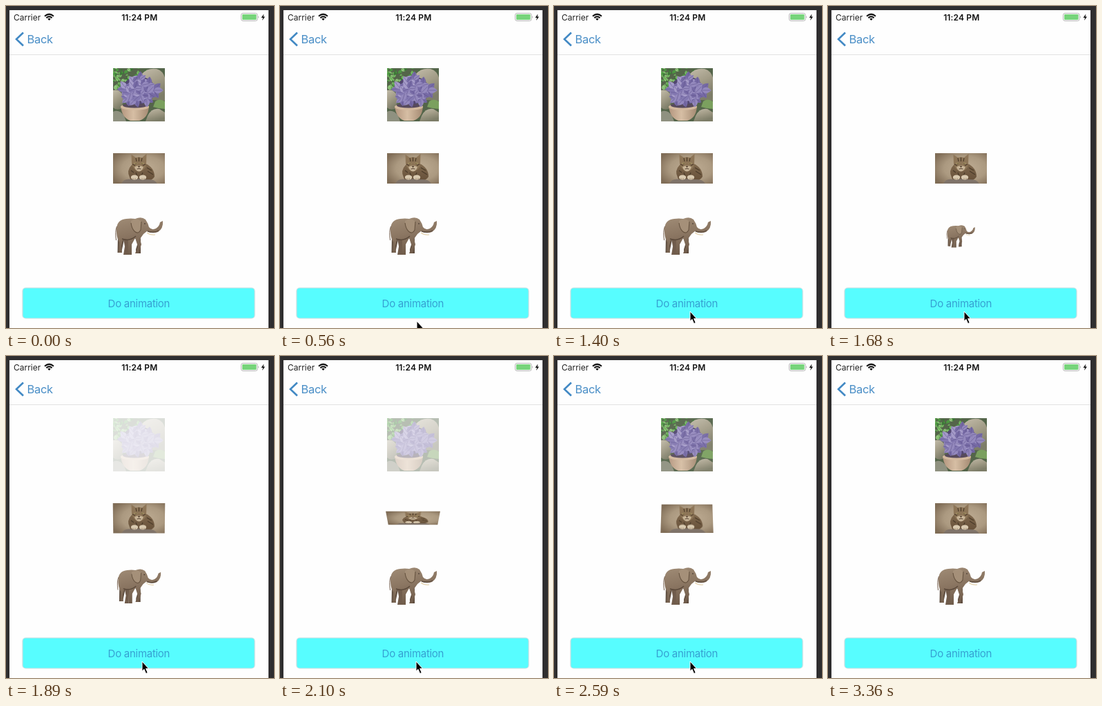
Animation of 388 by 466 pixels, one loop 3.64 s. Source, as an HTML page:

```html
<!DOCTYPE html>
<html lang="en">
<head>
<meta charset="utf-8">
<title>Do animation</title>
<style>
  html, body { margin: 0; width: 100%; height: 100%; overflow: hidden; background: #2f2e2f; }
  #stage { position: relative; width: 388px; height: 466px; overflow: hidden; }
  svg { position: absolute; display: block; }
  text { font-family: Inter, "Liberation Sans", sans-serif; }
  #cat { left: 155px; top: 213px; }
  #elephant { transform-origin: 191.5px 333.5px; }
</style>
</head>
<body>
<div id="stage">
  <svg width="388" height="466" viewBox="0 0 388 466">
    <defs>
      <clipPath id="plantBox"><rect x="155" y="90" width="75" height="77"/></clipPath>
      <linearGradient id="pot" x2="1">
        <stop stop-color="#b3957e"/><stop offset=".45" stop-color="#d6bea4"/><stop offset="1" stop-color="#a48a72"/>
      </linearGradient>
      <linearGradient id="rock" x2=".4" y2="1">
        <stop stop-color="#c2bba9"/><stop offset=".5" stop-color="#a39d88"/><stop offset="1" stop-color="#7d7d68"/>
      </linearGradient>
      <linearGradient id="hide" x2=".3" y2="1">
        <stop stop-color="#a08c76"/><stop offset=".5" stop-color="#8b7662"/><stop offset="1" stop-color="#6f5b4a"/>
      </linearGradient>
    </defs>
    <rect width="388" height="466" fill="#2f2e2f"/>
    <rect x="5" y="6" width="375" height="460" fill="#fefefe"/>

    <text x="11" y="20.5" font-size="12" fill="#222">Carrier</text>
    <path d="M56 14.8Q62.5 9 69 14.8M58.4 17.2Q62.5 13.6 66.6 17.2" fill="none" stroke="#111" stroke-width="2.1"/>
    <path d="M60.2 18.6Q62.5 16.8 64.8 18.6L62.5 21Z" fill="#111"/>
    <text x="193.3" y="20.5" font-size="12" font-weight="600" letter-spacing=".15" text-anchor="middle" fill="#111">11:24 PM</text>
    <rect x="340.5" y="10.5" width="23.5" height="11" rx="2.6" fill="#fff" stroke="#b4b4b4"/>
    <rect x="342" y="12" width="20.5" height="8" rx="1.3" fill="#77d47b"/>
    <path d="M365.3 14.2Q367 16 365.3 17.8Z" fill="#999"/>
    <path d="M373.3 11.5L369.5 17H372L371 21L375 15.4H372.6Z" fill="#111"/>

    <path d="M25 38.5L15 48L25 57.5" fill="none" stroke="#4289c4" stroke-width="2.6"/>
    <text x="30.6" y="54" font-size="16.5" letter-spacing="-.35" fill="#4b8fc7">Back</text>
    <path d="M5 70.5H380" stroke="#e2e2e2"/>

    <g id="plant" clip-path="url(#plantBox)">
      <rect x="155" y="90" width="75" height="77" fill="#54654a"/>
      <g id="greens"></g>
      <path d="M197 98Q205 89 218 91Q231 95 231 112V137L210 136Q196 119 197 98Z" fill="url(#rock)"/>
      <path d="M155 122Q165 119 170 131L168 148Q160 152 155 147Z" fill="url(#rock)"/>
      <path d="M205 159Q211 147 222 149L230 154V167H202Z" fill="url(#rock)"/>
      <path d="M155 153Q164 149 171 159L174 167H155Z" fill="#8f9180"/>
      <path d="M216 138Q222 133 230 138V149Q222 149 213 146Z" fill="#7ba05f"/>
      <path d="M166 145Q168 162 180 166H193Q206 162 207 145Z" fill="url(#pot)"/>
      <ellipse cx="186.5" cy="146" rx="20.5" ry="5" fill="#d3b99e"/>
      <ellipse cx="186.5" cy="144" rx="17.5" ry="3.4" fill="#574a5c"/>
      <g id="leaves"></g>
    </g>

    <g id="elephant">
      <path d="M162 330L161.5 357H167L171 338L177 337L193 336L188 352L188 358H195L195 339L194 327Z" fill="#5f4e40"/>
      <path d="M160 322Q161 309 174 308Q181 307 187 308Q196 304 202 309Q206 315 207 320Q211 325 217 322Q222 319 223 313L227 311Q228 322 220 327Q212 330 204 326L199 330L194 337L196 345L192 358H187L191 348L187 336L182 345L182 360H176L176 340Q171 336 169 339L167 347L168 357H163L164 342Q159 333 160 322Z" fill="url(#hide)"/>
      <path d="M170 337L177 338L176 360H170L172 348Z" fill="#705c4c"/>
      <path d="M181 311Q189 305 196 312L195 324Q192 331 186 326Q181 320 181 311Z" fill="#a59079"/>
      <path d="M196 312L195 324Q192 331 186 326Q182 322 181 314" fill="none" stroke="#665340" stroke-width="1.1"/>
      <path d="M160.5 319Q157.5 326 159.5 339" fill="none" stroke="#76604f"/>
      <path d="M168 337Q179 341 188 333M205 326Q214 329 221 325" fill="none" stroke="#59483a" stroke-width="1.4"/>
      <circle cx="201" cy="315" r=".8" fill="#2f241c"/>
      <path d="M204 328Q209 332 216 331" fill="none" stroke="#e5d3af" stroke-width="1.2"/>
    </g>

    <rect x="24" y="408" width="336" height="44" rx="4.5" fill="#57fdff"/>
    <rect x="24" y="408" width="336" height="44" rx="4.5" fill="none" stroke="#c5dfe2" stroke-width="1.2"/>
    <text x="192.4" y="436" font-size="15" letter-spacing="-.28" text-anchor="middle" fill="#36a0d2">Do animation</text>
  </svg>

  <svg id="cat" width="75" height="44" viewBox="0 0 75 44">
    <defs>
      <radialGradient id="wall" cx=".58" cy=".5" r=".68">
        <stop stop-color="#c0ae95"/><stop offset=".6" stop-color="#ab9980"/><stop offset="1" stop-color="#806d57"/>
      </radialGradient>
      <linearGradient id="fur" x2="0" y2="1">
        <stop stop-color="#80694e"/><stop offset="1" stop-color="#665039"/>
      </linearGradient>
    </defs>
    <rect width="75" height="44" fill="url(#wall)"/>
    <path d="M24 35Q19 25 27 17L47 15Q60 21 60 34Q56 41 47 39L31 40Q25 40 24 35Z" fill="url(#fur)"/>
    <path d="M27 15L26.5 2L33 6.5Q37 5 42 6.5L48.5 1L48 16Q47 25 38 26Q29 25 27 15Z" fill="#8d7557"/>
    <path d="M33 7L34 12M37.5 6V12M42 7L41 12M28 16L32 18M47 16L43 18M49 21L56 25M50 26L58 31M26 25L30 28M33 28L35 33M43 28L41 33" fill="none" stroke="#4b3b29" stroke-width="1.2"/>
    <path d="M31 20Q37.5 16 44 20Q42 26 37.5 26.5Q33 26 31 20Z" fill="#c7b497"/>
    <path d="M30 14.8Q33 13 35 15.8ZM40 15.8Q42 13 45 14.8Z" fill="#b8ad6f"/>
    <path d="M32 15.2H34M41 15.2H43M36 19H39L37.5 20.5ZM34.5 23Q37.5 21.5 40.5 23" fill="#76503f" stroke="#3d2e20" stroke-width=".7"/>
    <path d="M12 44Q16 36 28 38L37 37L50 38Q60 37 64 44Z" fill="#7f7369"/>
    <ellipse cx="31" cy="35" rx="5.2" ry="3.4" fill="#d9cab0"/>
    <ellipse cx="43" cy="35" rx="5.2" ry="3.4" fill="#d9cab0"/>
    <path d="M29 36V38M32 36V38M42 36V38M45 36V38" stroke="#876f52" stroke-width=".7"/>
  </svg>

  <svg id="cursor" width="12" height="21" viewBox="-1 -1 12 21">
    <path d="M0 0V14.2L3 11.4L5.6 17.6L8.2 16.5L5.6 10.4H9.6Z" fill="#000" stroke="#fff"/>
  </svg>
</div>
<script>
const LOOP = 3640, STEP = 70;
const $ = id => document.getElementById(id);

let seed = 17;
const rand = () => (seed = seed * 16807 % 2147483647) / 2147483647;

function drawLeaf(x, y, length, angle, fill, vein) {
  const w = length * 0.5;
  return `<g transform="translate(${x} ${y}) rotate(${angle})">
    <path d="M0 0Q${length * 0.35} ${-w * 1.3} ${length} 0Q${length * 0.35} ${w * 1.3} 0 0" fill="${fill}"/>
    <path d="M1 0H${length * 0.9}" stroke="${vein}" stroke-width=".5"/></g>`;
}

function drawSprig(x, y, tones) {
  const turn = rand() * 60;
  let sprig = "";
  for (let i = 0; i < 6; i++) {
    sprig += drawLeaf(x, y, 9 + rand() * 5, turn + i * 60 + rand() * 24, tones[i % 4], "#5d5189");
  }
  return sprig;
}

function drawFoliage() {
  const greenTones = ["#4fa044", "#7cc267", "#3c7638", "#9bd083"];
  const purpleTones = ["#766aa5", "#9489bd", "#8378b1", "#a59bc9"];
  let greens = "", leaves = "";
  for (let i = 0; i < 75; i++) {
    greens += drawLeaf(153 + rand() * 49, 89 + rand() * 30, 3 + rand() * 4, rand() * 360,
      greenTones[i % 4], "#447d3b");
  }
  for (let i = 0; i < 13; i++) {
    const a = i * 2.4, r = Math.sqrt(1 - i / 13);
    leaves += drawSprig(192 + Math.cos(a) * r * 22, 122 + Math.sin(a) * r * 17, purpleTones);
  }
  $("greens").innerHTML = greens;
  $("leaves").innerHTML = `<ellipse cx="192" cy="122" rx="24" ry="20" fill="#51476f"/>` + leaves;
}

// Each track is a list of [time, value].
const tracks = {
  fade: [[1679, 1], [1680, 0], [1890, 0.2], [2310, 0.62], [2590, 0.95], [2730, 1]],
  flip: [[1750, 0], [1890, 8], [2310, 119], [2590, 160], [2800, 180]],
  scale: [[1679, 1], [1680, 0.6], [1890, 0.92], [2030, 1]],
  cursorX: [[560, 198], [1120, 197], [2800, 197], [3290, 197]],
  cursorY: [[420, 470], [560, 456], [910, 449], [1120, 449], [1330, 442],
    [2800, 442], [3290, 459], [3360, 470]]
};

function valueAt(track, t) {
  const next = track.findIndex(k => k[0] > t);
  if (next === 0) return track[0][1];
  if (next < 0) return track[track.length - 1][1];
  const [t0, v0] = track[next - 1], [t1, v1] = track[next];
  return v0 + (v1 - v0) * (t - t0) / (t1 - t0);
}

function render(now) {
  const t = Math.floor(now % LOOP / STEP) * STEP;
  const at = name => valueAt(tracks[name], t);
  const angle = at("flip");
  $("plant").style.opacity = at("fade");
  $("cat").style.transform = `perspective(400px) rotateX(${angle < 90 ? -angle : 180 - angle}deg)`;
  $("elephant").style.transform = `scale(${at("scale")})`;
  $("cursor").style.transform = `translate(${at("cursorX") - 1}px, ${at("cursorY") - 1}px)`;
}

drawFoliage();
const start = performance.now();
function tick() {
  render(performance.now() - start);
  requestAnimationFrame(tick);
}
tick();
</script>
</body>
</html>
```
